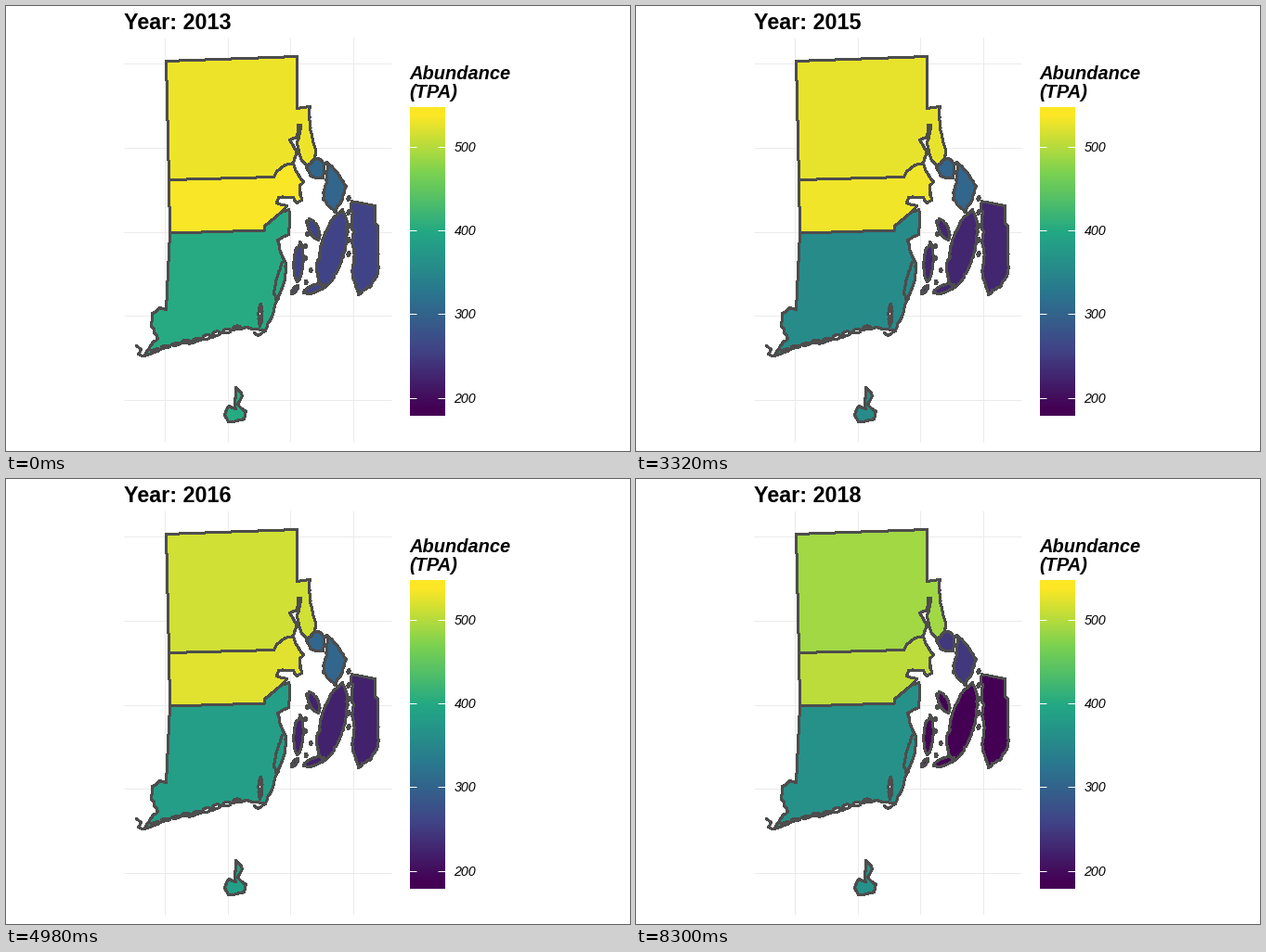
A matplotlib script that plays this animation: 672 px wide and 480 px high, repeating every 9.96 s.

```python
import numpy as np
import matplotlib.pyplot as plt
from matplotlib.animation import FuncAnimation
from matplotlib.colors import LinearSegmentedColormap

W, H, DPI = 672, 480, 96
INK = "#4d4d4d"
PX = 72 / DPI
rng = np.random.default_rng(11)
shade = LinearSegmentedColormap.from_list("scale", plt.cm.viridis(np.linspace(0, 1, 6)), N=1024)


def shore(pts, rough=.2):
    """Ragged coast through key points, by midpoint displacement."""
    pts = np.array(pts, float)
    while True:
        step = np.diff(pts, axis=0)
        size = np.hypot(*step.T)
        if size.max() < 4:
            return pts
        out = [pts[0]]
        for a, d, n in zip(pts, step, size):
            if n >= 4:
                side = np.array([-d[1], d[0]]) / n
                out.append(a + d / 2 + side * rng.normal(0, rough * n ** .5))
            out.append(a + d)
        pts = np.array(out)


def ring(*pts, rough=.2):
    return shore(pts + pts[:1], rough)


def isle(start, end, width, rough=.2):
    """Spindle-shaped island around a straight spine."""
    a, b = np.array(start, float), np.array(end, float)
    d = b - a
    side = np.array([-d[1], d[0]]) / np.hypot(*d)
    t = np.linspace(0, 1, 7)[:, None]
    bulge = side * width * np.sqrt(np.sin(np.pi * t).clip(0))
    spine = a + d * t
    return shore(np.vstack([spine + bulge, (spine - bulge)[::-1]]), rough)


# Borders shared by neighbouring counties
north_kent = [(175, 187), (288, 184), (291, 178), (300, 171), (309, 169)]
kent_south = [(176, 244.5), (278, 241.5), (278, 237), (290, 227), (297, 221)]

north = np.vstack([
    [(172, 59), (313, 54)],
    shore([(313, 110), (327, 108), (327, 126), (330, 145), (333, 156), (332, 164),
           (324, 172), (318, 166), (313, 148), (317, 128), (314, 128), (312, 142),
           (305, 144), (313, 157), (309, 169)], .12),
    north_kent[::-1]])
kent = np.vstack([
    north_kent,
    shore([(309, 169), (312, 178), (320, 189), (316, 193), (318, 209), (313, 212),
           (309, 206), (293, 206), (291, 212), (302, 215), (297, 221)], .15),
    kent_south[::-1]])
south = np.vstack([
    kent_south,
    shore([(297, 221), (304, 219), (304, 246), (292, 252), (300, 275), (299, 298),
           (290, 320), (279, 349), (262, 347), (200, 363), (149, 377), (163, 358),
           (156, 345), (157, 331), (165, 325), (172, 327)])])
block = ring((247, 411), (254, 420), (249, 429), (258, 437), (256, 445), (239, 448),
             (235, 440), (240, 431), (247, 434), (246, 424), rough=.15)

bristol = [
    ring((323, 174), (333, 164), (343, 170), (341, 185), (330, 184)),
    ring((345, 168), (351, 173), (366, 194), (362, 208), (354, 222), (341, 208), (345, 190))]

newport = [
    np.vstack([[(381, 212), (397, 215), (397, 234), (400, 237), (400, 264)],
               shore([(400, 264), (400, 288), (393, 301), (379, 311), (373, 289),
                      (372, 240), (372, 210), (381, 212)])]),
    isle((362, 219), (340, 305), 13),
    isle((320, 309), (342, 300), 4),
    isle((316, 254), (313, 297), 5),
    isle((326, 229), (336, 252), 5),
    isle((307, 310), (314, 301), 2)]
for y in range(207, 270, 15):
    newport.append(isle((369, y - 2), (368, y + 2), 1))
for y in range(232, 300, 13):
    x = rng.uniform(320, 328)
    newport.append(isle((x, y - 1), (x, y + 2), 1))

# Salt ponds behind the south coast, and the tidal river at its east end
ponds = [isle((274, 321), (273, 345), 2, .1)]
for t in np.linspace(.08, .86, 9):
    x, y = 262 - 113 * t, 344 + 30 * t
    ponds.append(isle((x, y), (x - 9, y + rng.uniform(0, 3)), rng.uniform(1, 2.5), .1))
spits = [shore([(140, 366), (145, 370), (142, 375), (149, 377)], .1),
         shore([(267, 352), (271, 355), (279, 350)], .1),
         shore([(297, 276), (289, 304), (290, 316)])]

# Shapes of each county and its place on the colour scale, year by year
counties = [
    ([north], [.975, 1, .965, .93, .89, .86]),
    ([kent], [.993, .997, .98, .955, .955, .9]),
    ([south, block], [.61, .592, .48, .56, .53, .505]),
    (bristol, [.33] * 5 + [.165]),
    (newport, [.203, .187, .11, .1, 0, 0])]

fig = plt.figure(figsize=(W / DPI, H / DPI), dpi=DPI, facecolor="white")
ax = fig.add_axes([0, 0, 1, 1])
ax.axis("off")


def rule(x0, y0, x1, y1, color, z):
    ax.plot([x0, x1], [y0, y1], color=color, lw=PX, zorder=z, snap=False,
            solid_capstyle="butt")


def label(x, y, s, size, **kw):
    return ax.text(x, y, s, fontsize=size, family="Liberation Sans",
                   color="black", va="baseline", **kw)


def land(pts, color="white", z=2):
    return ax.add_patch(plt.Polygon(pts, facecolor=color, edgecolor=INK, lw=2 * PX,
                                    joinstyle="round", antialiased=False, zorder=z))


for x in np.linspace(171, 374, 4).round():
    rule(x, 34, x, 470, "#ebebeb", 0)
for y in np.linspace(62, 425, 5).round():
    rule(127, y, 415, y, "#ebebeb", 0)

patches = [([land(s) for s in shapes], values) for shapes, values in counties]
for pond in ponds:
    land(pond, z=3)
for spit in spits:
    ax.plot(*spit.T, color=INK, lw=2 * PX, zorder=3, antialiased=False)

# Colour bar, blended between 20 bins with flat ends
level = np.clip((np.arange(333) + .5) / 333 * 20 - .5, 0, 19) / 19
ax.imshow(shade(level[::-1])[:, None], extent=(434.5, 472.5, 441.5, 108.5),
          aspect="auto", interpolation="nearest", zorder=2)
for i in range(4):
    y = round(152 + 90.2 * i)
    rule(434.5, y, 442, y, "white", 3)
    rule(465, y, 472.5, y, "white", 3)
    label(482, y + 4.6, str(500 - 100 * i), 10.7, style="italic")

for y, word in ((78.4, "Abundance"), (98.4, "(TPA)")):
    label(434, y, word, 15, weight="bold", style="italic")
title = label(126.5, 24.4, "", 17.5, weight="bold")

ax.set_xlim(-.5, W - .5)
ax.set_ylim(H - .5, -.5)


def draw(i):
    title.set_text(f"Year: {2013 + i}")
    for group, values in patches:
        for p in group:
            p.set_facecolor(shade(float(values[i])))
    return [title]


anim = FuncAnimation(fig, draw, frames=6, interval=1660, repeat=True,
                     repeat_delay=0, blit=False)
plt.show()
```
